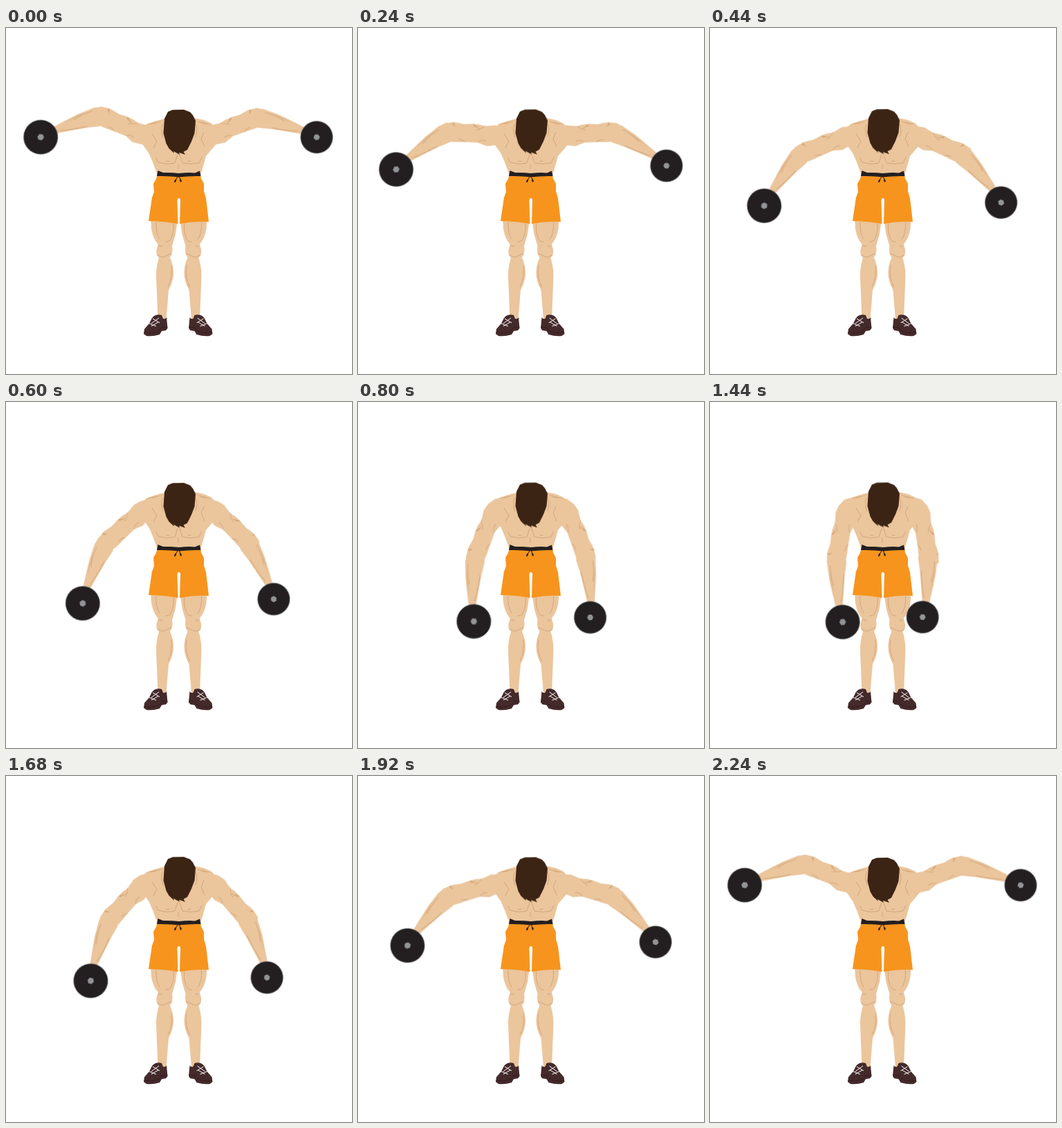
Animation, 500 px wide and 500 px high, one loop 2320 ms. Source, as an HTML page:

```html
<!DOCTYPE html>
<html lang="en">
<head>
<meta charset="utf-8">
<title>Bent-over lateral raise</title>
<style>
  html, body { margin: 0; width: 100%; height: 100%; overflow: hidden; background: #fff; }
  svg { display: block; width: 100vw; height: 100vh; }

  .skin { fill: #ebc59c; }
  .line { fill: none; stroke: #c99d72; stroke-width: .75; stroke-linecap: round; }
  .crease { fill: #d0a274; }
  .black { fill: #231f20; }
  .shoe { fill: #452a2b; }
  .lace { fill: none; stroke: #fff; stroke-width: 1; }

  .upper { animation: upper 2320ms infinite; }
  .fore { animation: fore 2320ms infinite; }
  .head { animation: head 2320ms infinite; }

  /* Joint angles: u = shoulder, f = elbow; s = foreshortening of the upper arm */
  .left {
    --u0: 116.6deg; --u1: 97.1deg; --u2: 51.2deg; --u3: -.8deg; --u4: 14.5deg; --u5: 77.9deg;
    --f0: -45.7deg; --f1: -42.7deg; --f2: -29.9deg; --f3: -17.1deg; --f4: -19.5deg; --f5: -37.7deg;
    --s2: 1px; --s3: 0px; --s4: -3px;
  }
  .right {
    --u0: 115deg; --u1: 97deg; --u2: 49deg; --u3: 1deg; --u4: 14deg; --u5: 78.5deg;
    --f0: -43deg; --f1: -39deg; --f2: -24deg; --f3: -16deg; --f4: -18.5deg; --f5: -35.5deg;
    --s2: -5px; --s3: -1px; --s4: -8px;
  }

  /* The pose advances every 40 ms */
  @keyframes upper {
    0% { transform: rotate(var(--u0)); animation-timing-function: steps(1); }
    3.448% { transform: rotate(var(--u0)); animation-timing-function: steps(4); }
    10.344% { transform: rotate(var(--u1)); animation-timing-function: steps(9); }
    25.862% { transform: rotate(var(--u2)); animation-timing-function: steps(10); }
    43.103% { transform: rotate(var(--u3)); animation-timing-function: steps(1); }
    55.172% { transform: rotate(var(--u3)); animation-timing-function: steps(4); }
    62.068% { transform: rotate(var(--u4)); animation-timing-function: steps(12); }
    82.758% { transform: rotate(var(--u5)); animation-timing-function: steps(8); }
    96.551%, 100% { transform: rotate(var(--u0)); }
  }
  @keyframes fore {
    0% { transform: translateY(0) rotate(var(--f0)); animation-timing-function: steps(1); }
    3.448% { transform: translateY(0) rotate(var(--f0)); animation-timing-function: steps(4); }
    10.344% { transform: translateY(0) rotate(var(--f1)); animation-timing-function: steps(9); }
    25.862% { transform: translateY(var(--s2)) rotate(var(--f2)); animation-timing-function: steps(10); }
    43.103% { transform: translateY(var(--s3)) rotate(var(--f3)); animation-timing-function: steps(1); }
    55.172% { transform: translateY(var(--s3)) rotate(var(--f3)); animation-timing-function: steps(4); }
    62.068% { transform: translateY(var(--s4)) rotate(var(--f4)); animation-timing-function: steps(12); }
    82.758% { transform: translateY(0) rotate(var(--f5)); animation-timing-function: steps(8); }
    96.551%, 100% { transform: translateY(0) rotate(var(--f0)); }
  }
  @keyframes head {
    0% { transform: translateY(0); animation-timing-function: steps(1); }
    3.448% { transform: translateY(0); animation-timing-function: steps(23); }
    43.103% { transform: translateY(-2px); animation-timing-function: steps(1); }
    55.172% { transform: translateY(-2px); animation-timing-function: steps(24); }
    96.551%, 100% { transform: translateY(0); }
  }
</style>
</head>
<body>
<svg viewBox="0 0 500 500">
  <defs>
    <g id="leg">
      <path class="skin" d="M209 276 L210 290 Q212 304 220 313 Q216 321 218 328 L221 332 Q217 345 217 358 L219.5 421 H231.5 L235 379 Q242 365 242 355 Q242 342 237 332 Q242 325 240 315 L245 298 248 276Z"/>
      <path class="line" d="M217 281 Q216 296 222 305 M242 283 Q243 300 236 308 L231 309 M219 328 Q225 333 230 330 T239 326 M239 344 Q241 362 234 374 M220 314 Q223 317 226 315"/>
    </g>
    <g id="shoe">
      <path class="shoe" d="M214 416 Q219 413 225 415 L227 420 Q231 421 232 418 L233.5 434 231 437 225 438 222 443 Q212 446 203 445 L199 442 200 435 207 427 211 419Z"/>
      <path class="line" style="stroke:#2d1a1b" d="M200 440 Q213 442 221 438 L225 433 233 432"/>
      <path class="lace" d="M212 420 L222 426 M221 419 L210 427 M207 427 L217 431 M220 425 L210 431"/>
    </g>
    <g id="upperArm">
      <path class="skin" d="M-4 -21 L-11 -17 -17 -6 -19 5 Q-17 13 -16 20 Q-18 29 -17 37 L-15 50 Q-16 58 -16 65 L-13 78 0 82 12 70 Q13 63 12 58 L10.500 45 9 27 12.500 14 8 -6 4 -18Z"/>
      <path class="line" d="M-16 20 Q-12 22 -9 31 M8 27 Q4 24 5 16 M10 45 Q7 49 8 55"/>
      <path class="crease" d="M-17 37 L-11 26 -14 36Z M-16 66 L-9 62 -13 67Z"/>
    </g>
    <g id="foreArm">
      <path class="skin" d="M-13 -5 L-15 5 -14 28 -12 43 -8 70 H2 L6 43 9 24 13 6 12 -5 0 -13Z"/>
      <path class="line" d="M-11 9 Q-12 26 -8 38 M7 24 Q5 45 0 62"/>
      <path class="crease" d="M-13 16 L-8 53 -11 36Z M7 26 L2 56 5 38Z"/>
    </g>
    <g id="plate">
      <circle class="black" r="24.7" stroke="#66676a" stroke-width=".7"/>
      <path fill="#929497" d="M-4.8 0 L-2.4 -4.3 2.4 -4.3 4.8 0 2.4 4.3 -2.4 4.3Z"/>
    </g>
  </defs>

  <use href="#leg"/>
  <use href="#leg" transform="translate(499.5 0) scale(-1 1)"/>
  <use href="#shoe"/>
  <use href="#shoe" transform="translate(497.5 0) scale(-1 1)"/>

  <path class="skin" d="M229 131 L214 135 203 139 194 148 191 160 198 169 207 182 212 194 217 207 218 212 H281 L284 203 289 185 301 171 309 160 305 147 297 138 286 133 272 130Z"/>

  <path fill="#f7941d" d="M219 211 L217 218 213 225 214 237 211 245 206 279 Q226 279 248.500 283 L247.500 249 Q247.500 246 249.700 246 Q252 246 252 249 L251 283 Q272 279 293 280 L289 246 286 236 286 225 282 218 281 211Z"/>
  <path class="black" d="M219.500 206 L227 209 Q238 208.500 250 210 Q264 208.500 273 209.500 L280 206.500 281.500 214 Q265 213.500 250 215.500 Q236 213.500 218 214Z"/>
  <path d="M248 215 L244.500 221 M250.500 215 L252.500 221" fill="none" stroke="#231f20" stroke-width="1"/>
  <path d="M245 220 L244.200 222 M252.200 219.500 L252.700 221.500" stroke="#231f20" stroke-width="2.200" stroke-linecap="round"/>

  <g class="left" transform="translate(201 160)">
    <g class="upper">
      <use href="#upperArm"/>
      <g transform="translate(0 72)">
        <g class="fore">
          <use href="#foreArm"/>
          <use href="#plate" y="91.500"/>
        </g>
      </g>
    </g>
  </g>
  <g class="right" transform="translate(299 160) scale(-1 1)">
    <g class="upper">
      <use href="#upperArm"/>
      <g transform="translate(0 71)">
        <g class="fore">
          <use href="#foreArm"/>
          <use href="#plate" transform="translate(0 90) scale(.94)"/>
        </g>
      </g>
    </g>
  </g>

  <path class="line" d="M217 188 L220 194 Q233 198 244 195 L248 183 M251 183 L255 195 Q268 198 279 195 L283 187 M249 197 V203 M211 153 L218 164 213 173 M286 151 L282 160 287 172"/>
  <path class="line" stroke-width="1.200" d="M232 192.500 H236 M263 192.500 H267"/>
  <path class="crease" d="M202 139.500 L228 134 213 138.500Z M274 134 L297 139.500 286 138.500Z"/>
  <path class="line" d="M226 139 Q223 148 227 158 M274 139 Q278 148 274 157"/>

  <path class="head" fill="#3c2415" d="M234 121 L241 118.200 257 118 266 121.500 270 126 274 134 272.500 152 268 164 262 176 256.500 179 259 183 250 180 251 183 242 178 243 181 235.500 174 231.500 167 227.500 152 229 131Z"/>
</svg>
</body>
</html>
```
